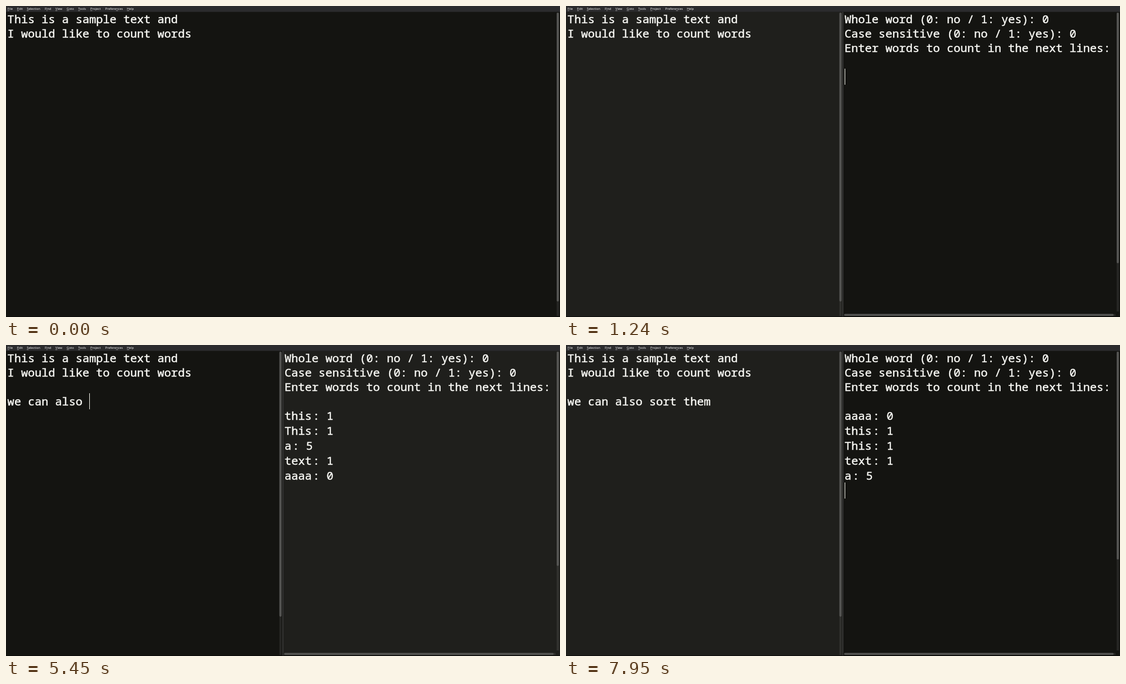
Recreate the animation shown at these times as an HTML page with a canvas. Size 998 by 561 pixels, loop 8000 ms.

```html
<!DOCTYPE html>
<html lang="en">
<head>
<meta charset="utf-8">
<title>Counting words in an editor</title>
<style>
  html, body { margin: 0; width: 100%; height: 100%; overflow: hidden; background: #141411; }
  canvas { display: block; width: 998px; height: 561px; }
</style>
</head>
<body>
<canvas id="stage" width="998" height="561"></canvas>
<script>
const ctx = document.getElementById('stage').getContext('2d');
const LOOP = 8000;
const CHAR = 12.29;
const CODE_FONT = '20.48px "Noto Sans Mono", monospace';
const UI = '"Open Sans", "Noto Sans", sans-serif';
const ACTIVE = '#141411', IDLE = '#1f1f1c';
const TRACK = 'rgba(255,255,255,.08)', THUMB = '#545452';

// Moments of the hard changes
const CARET_ON = 20, OPEN = 660, FILTER = 960, SPLIT = 1230, TO_LEFT = 4120,
  TO_RIGHT = 6710, REOPEN = 6980, REFILTER = 7310, SORT = 7550;

const INTRO = 'This is a sample text and\nI would like to count words';
const HEAD = ['Whole word (0: no / 1: yes): 0', 'Case sensitive (0: no / 1: yes): 0',
  'Enter words to count in the next lines:', ''];

// [start, end, keys]
const LEFT_KEYS = [[4420, 4700, '\n\n'], [4960, 5360, 'we can also '], [5690, 6170, 'sort them']];
const RIGHT_KEYS = [[1500, 1760, 'this\n'], [2060, 2720, 'This\na\n'],
  [2980, 3160, 'text\n'], [3420, 3640, 'aaaa']];

const MENU = [[3, '&File'], [20, '&Edit'], [37.5, '&Selection'], [70, 'F&ind'], [89, '&View'],
  [109.3, '&Goto'], [130, '&Tools'], [152, '&Project'], [178.7, 'Prefere&nces'], [217.8, '&Help']];

// Commands: "label|shortcut", the letter after * is a match
const COMMANDS = [
  'Arithmetic', 'Bookmarks: Clear All|Ctrl+Shift+F2', 'Bookmarks: Select All|Alt+F2',
  'Bookmarks: Select Next|F2', 'Bookmarks: Select Previous|Shift+F2', 'Bookmarks: Toggle|Ctrl+F2',
  'ParenthesisPainter: Documentation', 'ParenthesisPainter: Enable Debug Mode',
  'ParenthesisPainter: Find Matching Offscreen Bracket', 'ParenthesisPainter: Fold Bracket Content',
  'ParenthesisPainter: Jump to Left Bracket', 'ParenthesisPainter: Jump to Right Bracket'
];
const COUNTERS = ['NounGauge: *Count Words', 'NounGauge: Sort Words By *Counters (Ascending)',
  'NounGauge: Sort Words By *Counters (Descending)', 'Bookmarks: *Clear All|Ctrl+Shift+F2',
  'Project: *Close', 'File: *Close All', 'View: Toggle *Console', 'Edit: *Copy|Ctrl+C',
  'Edit: *Cut|Ctrl+X', 'Code Folding: Fold *Comments', 'ParenthesisPainter: Fold Bracket *Content',
  'Selection: *Clear'];
const MATCHES = [
  'Bookmarks: Clear *All|Ctrl+Shift+F2', 'Code Folding: Fold *All|Ctrl+K, Ctrl+1', 'File: Close *All',
  'Bookmarks: Select *All|Alt+F2', 'Selection: Select *All|Ctrl+A', 'Set Syntax: HTML (*ASP)',
  'Plugin Steward: Upgrade/Overwrite *All Packages', 'Neatly Data: Format *and Sort JSON',
  'Code Folding: Fold Tag *Attributes|Ctrl+K, Ctrl+T', 'ParenthesisPainter: Select Next *Attribute (left)',
  'ParenthesisPainter: Select Next *Attribute (right)', 'NounGauge: Sort Words By Counters (*Ascending)'
];

const clamp = (v, lo, hi) => Math.min(hi, Math.max(lo, v));

function typed(t, keys) {
  return keys.map(([start, end, text]) => {
    const n = Math.floor((t - start) / (end - start) * (text.length - 1) + 1e-6) + 1;
    return text.slice(0, clamp(n, 0, text.length));
  }).join('');
}

function count(word, text) {
  return text.toLowerCase().split(word.toLowerCase()).length - 1;
}

function rect(x, y, w, h, color) {
  ctx.fillStyle = color;
  ctx.fillRect(x, y, w, h);
}

function pill(x, y, w, h, color) {
  ctx.fillStyle = color;
  ctx.beginPath();
  ctx.roundRect(x, y, w, h, Math.min(w, h) / 2);
  ctx.fill();
}

function write(text, x, y, color, font) {
  ctx.font = font;
  ctx.fillStyle = color;
  ctx.fillText(text, x, y);
  return ctx.measureText(text).width;
}

// Editor text is a little heavier than the regular weight
function code(text, x, y) {
  write(text, x, y, '#fafaf6', CODE_FONT);
  ctx.strokeStyle = '#fafaf6';
  ctx.lineWidth = 0.45;
  ctx.strokeText(text, x, y);
}

const baseline = k => 31 + 26 * k + Math.max(0, k - 4);

function caret(x, k) {
  rect(Math.round(x), baseline(k) - 22, 1, 29, '#f8f8f0');
}

function scrollbar(x, end, bottom) {
  rect(x, 12, 4, bottom - 12, TRACK);
  pill(x, 12, 4, end - 12, THUMB);
}

function drawMenu() {
  rect(0, 0, 998, 10.5, '#2b2b2d');
  const font = '5.75px ' + UI;
  for (const [x, item] of MENU) {
    const [before, after] = item.split('&');
    write(before + after, x, 7, '#ffffff', font);
    const left = ctx.measureText(before).width;
    rect(x + left, 8, ctx.measureText(after[0]).width, 0.6, '#c8c8c8');
  }
}

function drawLeft(t, text, split, active) {
  rect(0, 10.5, split ? 498 : 998, 550.5, active ? ACTIVE : IDLE);
  const lines = text.split('\n');
  lines.forEach((line, k) => code(line, 2.6, baseline(k)));
  scrollbar(split ? 492.5 : 992, 533 - 21.5 * (lines.length - 2), 559);
  const covered = t >= OPEN && t < SPLIT;
  if (active && !covered && t >= CARET_ON) {
    caret(2.6 + CHAR * lines.at(-1).length, lines.length - 1);
  }
}

function drawRight(t, text, active) {
  const x0 = 501.7;
  rect(498, 10.5, 500, 550.5, active ? ACTIVE : IDLE);
  rect(498, 10.5, 1.5, 550.5, '#3d3d3c');
  HEAD.forEach((line, k) => code(line, x0, baseline(k)));

  const words = typed(t, RIGHT_KEYS).split('\n');
  if (t >= SORT) {
    words.sort((a, b) => count(a, text) - count(b, text));
    words.push('');
  }
  let end = x0;
  words.forEach((word, i) => {
    const y = baseline(4 + i);
    end = x0 + CHAR * word.length;
    code(word, x0, y);
    if (!word) return;
    const note = ': ' + count(word, text);
    code(note, end + 2, y);
    end += CHAR * note.length + 5.3;
  });
  scrollbar(992, [464, 447, 430, 414, 398.5, 387][words.length - 1], 551);
  rect(501, 555.5, 489, 3.5, TRACK);
  pill(501, 555.5, 485.5, 3.5, THUMB);
  const covered = t >= REOPEN && t < SORT;
  if (active && !covered) caret(end, words.length + 3);
}

function drawRow(item, x, y, selected) {
  const [label, keys] = item.split('|');
  const [before, match] = label.split('*');
  const font = '6.3px ' + UI;
  if (selected) rect(x + 2, y, 302, 13.4, '#444851');
  let pen = x + 5;
  pen += write(before, pen, y + 9, '#c3c6cc', font);
  if (match) {
    pen += write(match[0], pen, y + 9, '#ffffff', 'bold ' + font);
    write(match.slice(1), pen, y + 9, '#c3c6cc', font);
  }
  if (keys) {
    ctx.textAlign = 'right';
    write(keys, x + 301, y + 8.8, '#b4b7be', '5.75px ' + UI);
    ctx.textAlign = 'left';
  }
}

// first: index of the top item within the whole list
function drawPalette(x, query, items, selected, first = 0) {
  const row = 13.5, top = 29.3, view = 163, full = 156 * row;
  ctx.save();
  ctx.shadowColor = 'rgba(0,0,0,.6)';
  ctx.shadowBlur = 5;
  rect(x, 11, 312, 183, '#2b2e36');
  ctx.restore();
  rect(x + 2, 12, 308, 15.5, '#464a53');
  const width = write(query, x + 5, 22.8, '#f0f0f0', '7px ' + UI);
  rect(x + 5 + width, 13.5, 0.9, 12.5, query ? '#f0f0f0' : '#e0a070');

  // keep the selected row fully in view
  const shift = Math.max(0, (selected + 1) * row - view);
  ctx.save();
  ctx.beginPath();
  ctx.rect(x, top, 312, view);
  ctx.clip();
  items.forEach((item, i) => drawRow(item, x, top + i * row - shift, i === selected));
  ctx.restore();

  rect(x + 306, top, 3.5, view, '#363a43');
  pill(x + 306, top + first * row / full * view, 3.5, view * view / full, '#5a5e67');
}

function drawPalettes(t) {
  if (t >= OPEN && t < FILTER) drawPalette(343, '', COMMANDS, 0);
  if (t >= FILTER && t < SPLIT) drawPalette(343, 'c', COUNTERS, 0);
  if (t >= REOPEN && t < REFILTER) drawPalette(593, '', COMMANDS, 0);
  // the last command used for this query is selected at once
  if (t >= REFILTER && t < SORT) drawPalette(593, 'a', MATCHES, MATCHES.length - 1, 12);
}

function draw(t) {
  const split = t >= SPLIT;
  const leftActive = !split || (t >= TO_LEFT && t < TO_RIGHT);
  const text = INTRO + typed(t, LEFT_KEYS);
  drawLeft(t, text, split, leftActive);
  if (split) drawRight(t, text, !leftActive);
  rect(0, 560, 998, 1, '#0b0b0a');
  drawMenu();
  drawPalettes(t);
}

const begin = performance.now();
function tick() {
  draw((performance.now() - begin) % LOOP);
  requestAnimationFrame(tick);
}
tick();
</script>
</body>
</html>
```
